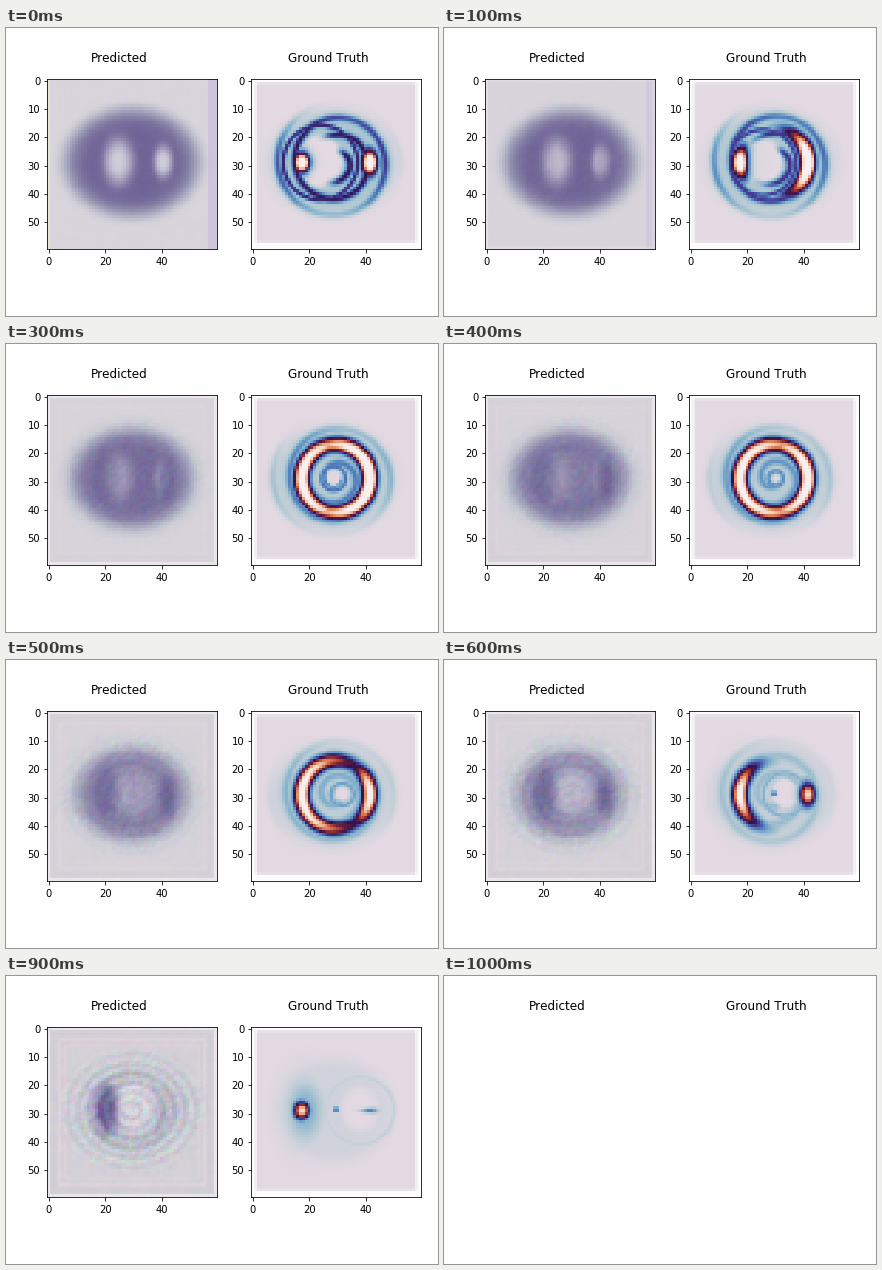
Recreate the animation shown at these times as a matplotlib script. Size 432 px wide and 288 px high, loop 1160 ms.

```python
import numpy as np
import matplotlib.pyplot as plt
from matplotlib.animation import FuncAnimation
from matplotlib.colors import LinearSegmentedColormap

W, H, DPI, N = 432, 288, 72, 60
STEP, LOOP, HOLD, SHOWN = 20, 1160, 100, 10
Y, X = np.mgrid[0:N, 0:N].astype(float)
CX, CY = 29.5, 29

# Colours at even steps of the wave height from -0.1 to 1.
CMAP = LinearSegmentedColormap.from_list("wave", [
    "#fcfcfd", "#e2d9e2", "#b4c9d3", "#82b0cd", "#5483bd", "#47459c",
    "#2e1450", "#64183c", "#b34232", "#e08a5c", "#f3d3c2", "#f8f0f0"], N=512)


def blob(cx, cy, rx, ry, p=4):
    d = np.hypot((X - cx) / rx, (Y - cy) / ry)
    return np.exp(-np.minimum(d, 5) ** p)


def bump(d, w):
    return np.exp(-(d / w) ** 2)


def cover(c, lo, hi):
    return np.clip(np.minimum(c + 1, hi) - np.maximum(c, lo), 0, 1)


def mix(img, color, mask):
    m = np.clip(mask, 0, 1)[..., None]
    return img * (1 - m) + np.array(color) * m


def truth(u):
    """Spiral waves round a hot ring that opens, closes and shrinks to a spot."""
    r, th = np.hypot(X - CX, Y - CY), np.arctan2(Y - CY, X - CX)

    # Pale disc with spiral arms that fade away.
    disc = blob(CX - 1, CY, 22 - u, 18.5, 10)
    arms = (.5 + .5 * np.cos(th - r + 6 * (u - .22))) ** 2
    v = disc * (.12 - .08 * u + .38 * (1 - u) ** 1.3 * arms)

    # Drifting calm eye and the thin wave around it.
    ex, size = 24 + 14 * u, 1.5 + 6 * np.cos(np.pi * u / .9) ** 2
    eye = blob(ex, CY - .5, size, 1.2 * size, 8)
    v = v * (1 - eye) - .07 * (1 - u) * eye
    rim = bump(np.hypot(X - ex, Y - CY) - 1.75 * size, 1.1)
    v = np.maximum(v, (.4 * (1 - u) + .06) * rim)

    # Hot ring, seen through a left and a right window.
    front = bump(r - 12, 2.9)
    left = 16 + 180 * bump(u - .44, .2)
    right = 4 + 180 * bump(u - .33, .22)
    hot_l = (1.2 - .25 * u) * bump(np.degrees(np.pi - abs(th)), left)
    hot_r = (1.2 - .9 * u ** 3) * bump(np.degrees(th), right)
    v = np.maximum(v, front * np.maximum(hot_l, hot_r))
    v = np.maximum(v, .22 * u * blob(18.5, 29, 6, 10, 2))
    v = np.maximum(v, .3 * (u > .6) * blob(CX, 28.7, 1.2, 1))

    rgb = CMAP((v + .1) / 1.1)[..., :3]
    return mix(np.full((N, N, 3), .996), rgb,
               cover(X, 1.6, 58.4) * cover(Y, 1.2, 57.8))


def predicted(u, rng):
    """Blurred body that thins out into ripples, streaks and border lines."""
    img = np.ones((N, N, 3)) * (np.array([217, 213, 220]) - 5 * u)
    edge = np.maximum(abs(X - 29.5), abs(Y - 29.5))
    early = max(0, 1 - 3 * u)
    img = mix(img, (226, 230, 210), early * (X < 1))
    img = mix(img, (206, 197, 221), early * (X > 56))
    img = mix(img, (234, 230, 234), (1 - early) * (edge > 29))
    for inset, tint in ((2, (206, 205, 211)), (4, (228, 212, 222)),
                        (6, (222, 210, 218))):
        img = mix(img, tint, .7 * u * (abs(edge - 29.5 + inset) < .6))

    pale, dark = (207, 205, 217), (95, 88, 143)
    img = mix(img, (187, 198, 206), (.9 - .4 * u) * blob(CX, CY, 25, 20.5, 10))
    img = mix(img, (111, 100, 150),
              (1 - .75 * u * u) * blob(CX, CY, 23 - 6 * u, 18.4 - 4 * u, 8))
    for cx, rx, ry in ((24.8, 5, 8), (40.5, 3.2, 5.6)):
        img = mix(img, pale, (1 - 1.6 * u) * blob(cx, 28.7, rx, ry, 3))
    img = mix(img, pale, 2.5 * (u - .4) * blob(30.5, 28, 7.5, 9))
    img = mix(img, dark, .85 * u * blob(20.5, 28.5, 4.2, 9))
    img = mix(img, dark, 2.6 * u * (1 - u) * blob(42, 29.5, 3, 7))

    # Elliptic ripples, slightly out of step per colour, plus soft noise.
    r = np.hypot(X - CX, (Y - CY) / .87)[..., None]
    wave = 9 * u * u * np.sin(1.6 * r + np.array([0, .9, .4]) + 5 * u)
    n = rng.normal(0, 1 + 6 * u, (N, N, 3))
    n = (n + np.roll(n, 1, 0) + np.roll(n, 1, 1)) / 1.7
    body = blob(CX, CY, 25, 21, 8)[..., None]
    return np.clip(img + wave * body + n * (.15 + .85 * body), 0, 255) / 255


RNG = np.random.default_rng(4)
STATES = [(predicted(u, RNG), truth(u)) for u in np.linspace(0, 1, SHOWN)]

plt.rcParams.update({"font.family": "DejaVu Sans", "font.size": 10,
                     "text.kerning_factor": 6, "xtick.major.pad": 4.7})
fig = plt.figure(figsize=(W / DPI, H / DPI), dpi=DPI, facecolor="#fefefe")


def panel(left, title, cx):
    ax = fig.add_axes([left / W, 1 - 221.2 / H, 170 / W, 170 / H])
    im = ax.imshow(np.ones((N, N, 3)), interpolation="nearest")
    ax.set_xticks(range(0, 60, 20))
    ax.set_yticks(range(0, 60, 10))
    fig.text(cx / W, 1 - 34 / H, title, size=12, ha="center", va="baseline")
    return ax, im


PANELS = [panel(41.2, "Predicted", 113.6), panel(245.2, "Ground Truth", 322)]


def update(i):
    k = i * STEP // HOLD
    for j, (ax, im) in enumerate(PANELS):
        ax.set_visible(k < SHOWN)
        if k < SHOWN:
            im.set_data(STATES[k][j])
    return [ax for ax, _ in PANELS]


anim = FuncAnimation(fig, update, frames=LOOP // STEP, interval=STEP,
                     repeat=True, repeat_delay=0, blit=False)
plt.show()
```
